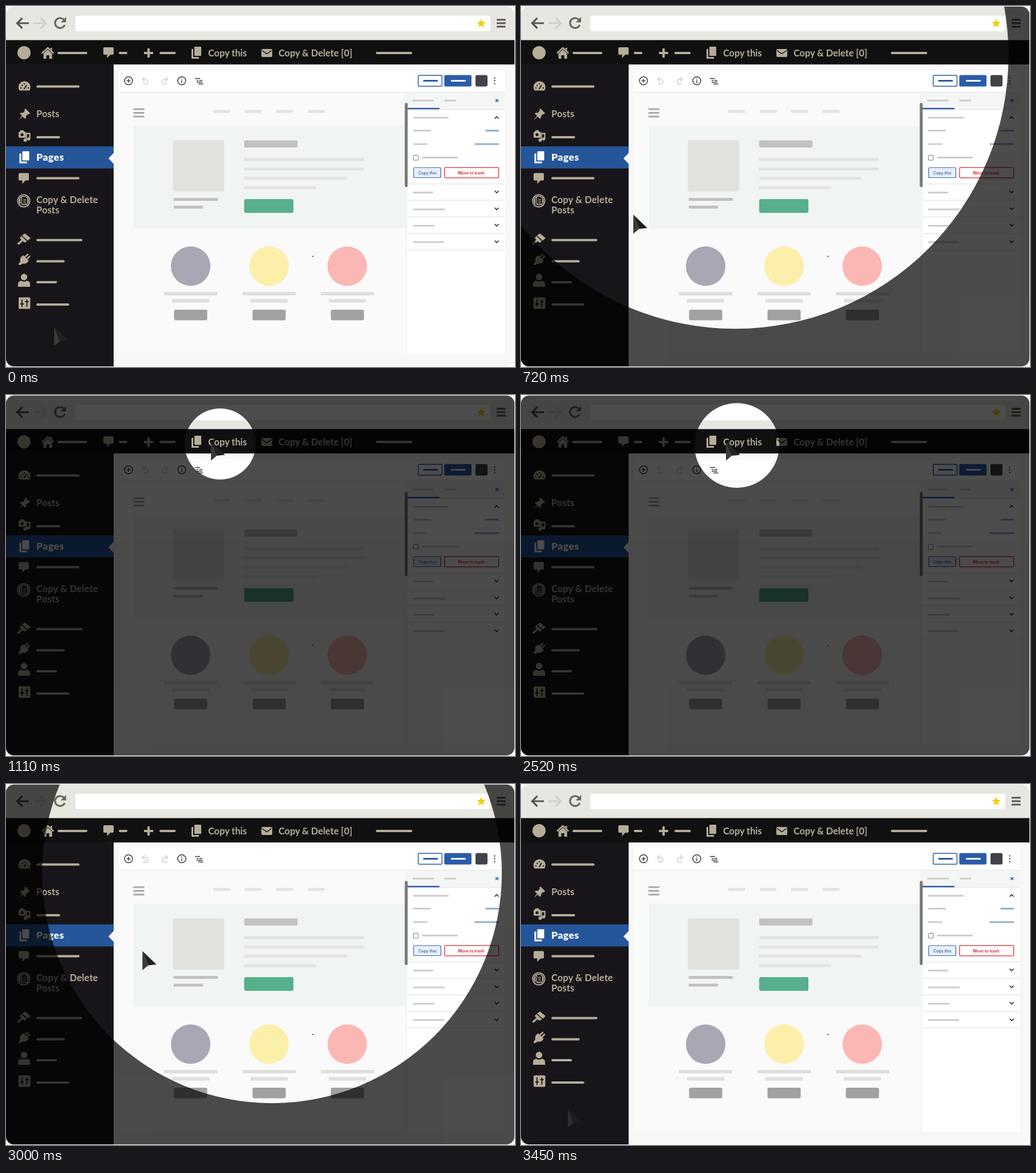
An HTML page for the animation above (4050 ms loop, 889x630 px).

```html
<!DOCTYPE html>
<html lang="en">
<head>
<meta charset="utf-8">
<title>Copy a page</title>
<style>
  html, body { margin: 0; width: 100%; height: 100%; overflow: hidden; background: #fff; }
  svg { display: block; }
  path { fill: none; }
  .tan { stroke: #b5ad98; }
  .tanFill, path.tanFill { fill: #b5ad98; }
  .dark { stroke: #18151a; }
  .darkFill, path.darkFill { fill: #18151a; }
  .menu { font: 700 16.3px Lato, sans-serif; fill: #b5ad98; }
  .side { letter-spacing: .2px; }
  .tiny { font: 500 7px Inter, sans-serif; text-anchor: middle; }
</style>
</head>
<body>
<svg width="889" height="630" viewBox="0 0 889 630">
  <defs>
    <clipPath id="frame"><rect y="1" width="888" height="628" rx="14"/></clipPath>
    <mask id="spot" maskUnits="userSpaceOnUse" x="0" y="0" width="889" height="630">
      <rect width="889" height="630" fill="#fff"/>
      <circle id="hole" fill="#000"/>
    </mask>
    <path id="bubble" d="M2 0H16q2 0 2 2V11q0 2-2 2H12L6.500 19V13H2q-2 0-2-2V2q0-2 2-2z" style="fill:#b5ad98"/>
    <g id="pages">
      <rect x="5" width="12" height="16" rx="1"/>
      <path d="M1.500 4V19.500H13" stroke="currentColor" stroke-width="3"/>
    </g>
    <g id="card">
      <path d="M-46.500 502H46.500M-32.500 514.500H32.500" stroke="#dfdfde" stroke-width="6"/>
      <rect x="-29" y="530" width="58" height="18.500" rx="3" fill="#a1a1a1"/>
    </g>
    <path id="down" d="M-3.500-1.500L0 2L3.500-1.500" stroke="#333" stroke-width="1.700"/>
  </defs>

  <g clip-path="url(#frame)">
    <rect width="889" height="630" fill="#f7f7f6"/>

    <!-- browser bar -->
    <rect width="889" height="60" fill="#e6e7e1"/>
    <rect x="121" y="17" width="725" height="27" rx="4" fill="#fff"/>
    <g stroke-width="3.200">
      <path d="M40 30H20M28.500 21L19.500 30L28.500 39" stroke="#5c564c"/>
      <path d="M48 30H68M60.500 21L69.500 30L60.500 39" stroke="#d0d0c9"/>
      <path d="M101 24A8.700 8.700 0 1 0 102.500 33" stroke="#6c675d"/>
      <path d="M857 24H872.500M857 30H872.500M857 36H872.500" stroke="#5c564c"/>
    </g>
    <path d="M105 19V28.500H95.500z" style="fill:#6c675d"/>
    <path id="star" style="fill:#f1ce0d"/>

    <!-- admin bar -->
    <rect y="59.500" width="889" height="42.500" fill="#101011"/>
    <circle cx="31.500" cy="81.500" r="11.500" class="tanFill"/>
    <path class="tan" stroke-width="4" stroke-linecap="round" d="M92 82H140M199 82H210M270 82H294.500M648 82H707.500"/>
    <path class="tan" stroke-width="2.500" d="M63 82.500L73 73L83 82.500"/>
    <path class="tanFill" d="M73 76L80.500 83V92H75.500V86H70.500V92H65.500V83zM77.500 73H80.500V78L77.500 75z"/>
    <use href="#bubble" x="170" y="72"/>
    <path class="tan" stroke-width="4" d="M241 82H257M249 74V90"/>
    <use href="#pages" x="324" y="71" fill="#b5ad98" color="#b5ad98"/>
    <rect x="446" y="75" width="19" height="14" rx="2" class="tanFill"/>
    <path d="M447 77.500L455.500 83.500L464 77.500" stroke="#101011" stroke-width="1.500"/>
    <text class="menu" x="353" y="88">Copy this</text>
    <text class="menu" x="476" y="88">Copy &amp; Delete [0]</text>

    <!-- sidebar -->
    <rect y="102" width="188" height="528" fill="#18151a"/>
    <rect y="245" width="188" height="38.500" fill="#25569a"/>
    <path d="M188.500 256L179 266L188.500 276z" style="fill:#f7f7f6"/>
    <path class="tan" stroke-width="4" stroke-linecap="round" d="M55 140.500H126.500M55 229H92.500M55 300.500H126.500M55 408.500H131.500M55 445.500H100.500M55 482H87M55 521H108.500"/>
    <path class="tanFill" d="M23.500 147.500A10.500 10.500 0 1 1 41 147.500z"/>
    <path class="dark" stroke-width="1.800" d="M31.500 145L36 138M25 143H27M27.500 138L29 139.500M32 135V137M38 143H40"/>
    <path class="tanFill" d="M34 179L42 187L40 189L38.500 188.500L35 192Q35.500 195 33.500 197L29 193L22 199L28 191.500L24 187.500Q26.500 185.500 29.500 186.500L33 182.500L32 181z"/>
    <rect x="22" y="219" width="12.500" height="11" rx="2.500" class="tanFill"/>
    <rect x="25" y="217" width="6" height="4" class="tanFill"/>
    <circle cx="28" cy="224.500" r="2.600" class="darkFill"/>
    <path class="tan" stroke-width="2.300" d="M35.500 234V222.500H41.500V231.500"/>
    <circle cx="33.500" cy="234" r="3" class="tanFill"/>
    <circle cx="39.500" cy="232" r="2.800" class="tanFill"/>
    <use href="#pages" x="23.500" y="253.500" fill="#fff" color="#fff"/>
    <use href="#bubble" x="22" y="291.500"/>
    <circle cx="31" cy="340" r="11.500" class="tanFill"/>
    <circle cx="31" cy="340" r="9.300" stroke-width="1" fill="none" class="dark"/>
    <path class="darkFill" d="M28 333H34L37 336V345H28z"/>
    <path class="dark" stroke-width="1.500" d="M26 335V347.500H35"/>
    <path class="tan" stroke-width="1.200" d="M30 337.500H35M30 340H35M30 342.500H35"/>
    <path class="tanFill" d="M33 397L43 405L38 409.500L28 400.500zM27 401.500L36.500 410.500L33 413L29 410.500L22 417L19.500 414.500L27 408L24 405z"/>
    <path class="tanFill" d="M30 435L39.500 444.500Q36 451 29 449.500L24 452.500L21.500 450.500L25 446Q23.500 438.500 30 435z"/>
    <path class="tan" stroke-width="2.500" stroke-linecap="round" d="M33 438L38 433.500M36.500 441.500L41 437"/>
    <circle cx="31.500" cy="473" r="5.700" class="tanFill"/>
    <path class="tanFill" d="M21 490V485Q21 480 27 479.500Q31.500 482.500 36 479.500Q42 480 42 485V490z"/>
    <rect x="22" y="508.500" width="20.500" height="20" rx="2" class="tanFill"/>
    <path class="dark" stroke-width="1.800" d="M28 512V525M36.500 512V525M25 520H31M33.500 516H39.500"/>
    <g class="menu side">
      <text x="53" y="194">Posts</text>
      <text x="53" y="270" fill="#fff" font-weight="900" style="font-size:17.500px;font-weight:900;letter-spacing:.4px">Pages</text>
      <text x="53" y="344">Copy &amp; Delete</text>
      <text x="53" y="362">Posts</text>
    </g>

    <!-- editor -->
    <rect x="188" y="102" width="700" height="9" fill="#fbf8fc"/>
    <rect x="197" y="112" width="674" height="495" fill="#fff"/>
    <rect x="197" y="151" width="500" height="456" fill="#fafafa"/>
    <rect x="697" y="151" width="4" height="456" fill="#f5f5f5"/>
    <rect x="701" y="151" width="170" height="29" fill="#f4f6f5"/>
    <path d="M197 150.500H871" stroke="#e9e9e9" stroke-width="1.500"/>
    <g stroke="#3c3c40" stroke-width="1.500">
      <circle cx="214" cy="130.500" r="7" fill="none"/>
      <circle cx="307" cy="130.500" r="7" fill="none"/>
      <path d="M210.500 130.500H217.500M214 127V134M307 129.500V134.500M307 126.500V128"/>
      <path d="M330 126.500H339M333 130H336M337.500 130H343M333 133H343M336 136H344.500"/>
    </g>
    <g stroke="#cfcfcf" stroke-width="1.600">
      <path id="undo" d="M239 128H245A4.500 4.500 0 1 1 239.500 134.500M242.500 124L238.500 128L242.500 132"/>
      <use href="#undo" transform="matrix(-1 0 0 1 520.500 0)"/>
    </g>
    <rect x="720" y="121" width="41.500" height="19" rx="2" fill="#fff" stroke="#2a5ca8" stroke-width="1.500"/>
    <rect x="765.500" y="120.500" width="47.500" height="20" rx="2.500" fill="#2a5ca8"/>
    <path d="M730 130.500H753" stroke="#2a5ca8" stroke-width="3" stroke-linecap="round"/>
    <path d="M778.500 130.500H801.500" stroke="#fff" stroke-width="3" stroke-linecap="round"/>
    <rect x="820" y="120.500" width="21" height="20" rx="3" fill="#414249"/>
    <path d="M853.500 125.500h0M853.500 130.500h0M853.500 135.500h0" stroke="#3c3c40" stroke-width="2.400" stroke-linecap="round"/>

    <!-- page preview -->
    <path d="M222.500 180H241.500M222.500 186.500H241.500M222.500 193H241.500" stroke="#a9a9a9" stroke-width="3"/>
    <path d="M362 184H391.500M417 184H446.500M472 184H501.500M527 184H556.500" stroke="#e3e3e1" stroke-width="5"/>
    <rect x="223" y="209" width="474" height="179" fill="#f0f4f2"/>
    <rect x="291.500" y="234.500" width="89.500" height="89.500" rx="3" fill="#e1e2de"/>
    <rect x="416" y="234.500" width="93" height="12.500" rx="2" fill="#c1c2c0"/>
    <path d="M416 268H625M416 284.500H625M416 300.500H595M416 317H541" stroke="#e2e4e1" stroke-width="5"/>
    <path d="M293 337.500H370M293 351H344" stroke="#c0c1bf" stroke-width="5"/>
    <rect x="416" y="337" width="86" height="24" rx="3" fill="#57af8c"/>
    <circle cx="322.500" cy="454" r="34.500" fill="#a8a8b4"/>
    <circle cx="459.500" cy="454" r="34.500" fill="#fcefaa"/>
    <circle cx="596" cy="454" r="34.500" fill="#fbb7b4"/>
    <use href="#card" x="322.500"/><use href="#card" x="459.500"/><use href="#card" x="596.300"/>
    <circle cx="536" cy="437" r="1" fill="#222"/>

    <!-- settings panel -->
    <rect x="696.500" y="169" width="5" height="147" rx="2.500" fill="#777"/>
    <path d="M701 180.500H871M701 310.500H871M701 339H871M701 368H871M701 397H871M701 425.500H871" stroke="#e8e8e8" stroke-width="1.300"/>
    <path d="M701 179H757" stroke="#2a5ca8" stroke-width="2.500"/>
    <path d="M710 165H747M766 165H786M711 195H773M711 217.500H742M711 241H736M727 264.500H789M711 325.500H746M711 355H766M711 383.500H748M711 412H765" stroke="#cdcdcd" stroke-width="3.200"/>
    <path d="M837.500 217.500H861M818.500 241H861" stroke="#92aed5" stroke-width="3"/>
    <path d="M855 162.500L860 167.500M860 162.500L855 167.500" stroke="#2a5ca8" stroke-width="1.600"/>
    <rect x="711.500" y="260.500" width="8.500" height="8.500" rx="1" fill="#fff" stroke="#777"/>
    <use href="#down" transform="translate(857 195) scale(1 -1)"/>
    <use href="#down" x="857" y="324"/><use href="#down" x="857" y="353.500"/>
    <use href="#down" x="857" y="382"/><use href="#down" x="857" y="411"/>
    <rect x="712" y="282" width="47.500" height="17.500" rx="2" fill="#e9effa" stroke="#3463b0" stroke-width="1.200"/>
    <rect x="766" y="281.800" width="94.500" height="18" rx="1.500" fill="#fff" stroke="#e0282c" stroke-width="1.300"/>
    <text class="tiny" x="736" y="293.500" fill="#2a5ca8">Copy this</text>
    <text class="tiny" x="812.500" y="293.500" fill="#dc1e22" style="font-weight:600">Move to trash</text>

    <rect id="shade" width="889" height="630" fill="#000" opacity=".7" mask="url(#spot)"/>
    <g id="cursor">
      <path d="M0 0V33.500L10 25z" style="fill:#3a3a3a"/>
      <path d="M0 0L10 25L24.500 23.500z" style="fill:#202020"/>
    </g>
  </g>
</svg>
<script>
const LOOP = 4050, STEP = 30;
const $ = id => document.getElementById(id);
const hole = $('hole'), shade = $('shade'), cursor = $('cursor');

const star = Array.from({ length: 10 }, (_, i) => {
  const r = i % 2 ? 3.7 : 8, a = Math.PI * (i / 5 - .5);
  return [830 + r * Math.cos(a), 30.5 + r * Math.sin(a)];
});
$('star').setAttribute('d', 'M' + star.join('L') + 'z');

// [time, values...], linear between rows
const pointer = [[0, 84, 560], [450, 84, 560], [1110, 358, 81], [2655, 358, 81], [3450, 82, 566]];
const light = [
  [480, 374, 86, 747], [1090, 374, 85.5, 62], [2502, 374, 85.5, 62],
  [2520, 377, 88, 74], [3000, 464.5, 155.5, 401.5], [3450, 546.5, 219, 708.5]
];

function at(rows, t) {
  const n = rows.findIndex(row => row[0] > t);
  if (n === 0) return rows[0].slice(1);
  if (n < 0) return rows[rows.length - 1].slice(1);
  const a = rows[n - 1], b = rows[n], k = (t - a[0]) / (b[0] - a[0]);
  return a.slice(1).map((v, i) => v + (b[i + 1] - v) * k);
}

function draw(time) {
  const t = Math.floor(time % LOOP / STEP) * STEP;
  const [x, y] = at(pointer, t);
  const [cx, cy, r] = at(light, t);
  cursor.setAttribute('transform', `translate(${x} ${y})`);
  cursor.setAttribute('opacity', t < 3450 ? 1 : .6);
  hole.setAttribute('cx', cx);
  hole.setAttribute('cy', cy);
  hole.setAttribute('r', r);
  shade.style.display = t >= 480 && t < 3450 ? '' : 'none';
}

const start = performance.now();
function tick() {
  draw(performance.now() - start);
  requestAnimationFrame(tick);
}
tick();
</script>
</body>
</html>
```
